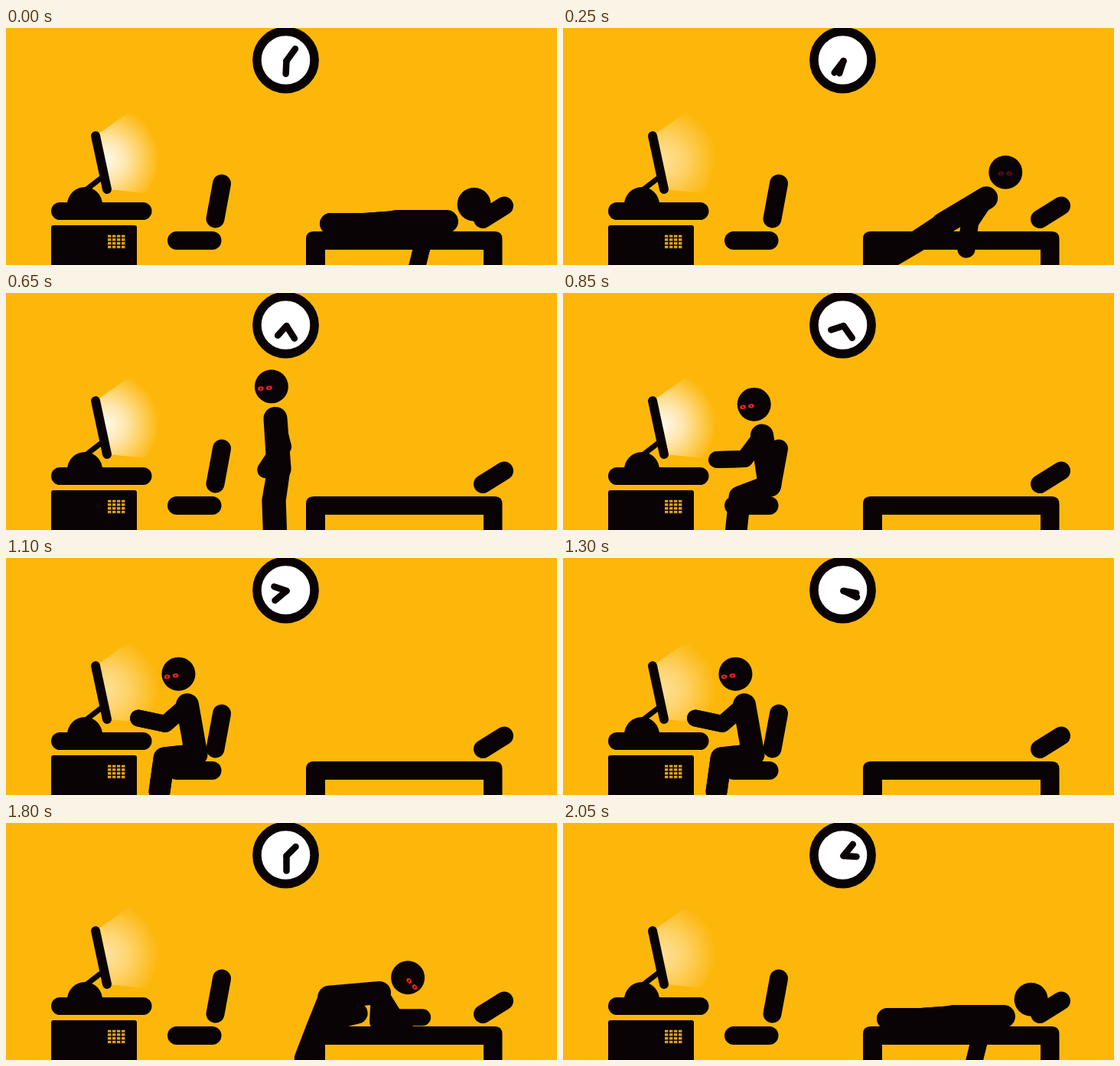
These frames come from a looping animation (720x310 px, 2.1 s). An HTML page:

```html
<!DOCTYPE html>
<html lang="en">
<head>
<meta charset="utf-8">
<title>Daily routine</title>
<style>
  html, body { margin: 0; width: 100%; height: 100%; overflow: hidden; background: #fdb70a; }
  svg { display: block; width: 720px; height: 310px; }
  #scene { filter: blur(.6px); }
  .line { fill: none; stroke: #0a0305; stroke-linecap: round; stroke-linejoin: round; }
  .ink { fill: #0a0305; }
  .hand { stroke-width: 8.5; }
  .pad { stroke-width: 24; }
  .arm { stroke-width: 22; }
  .leg { stroke-width: 28; }
  #torso { fill: #0a0305; stroke-width: 30; }
</style>
</head>
<body>
<svg viewBox="0 0 720 310">
  <defs>
    <radialGradient id="beam" gradientUnits="userSpaceOnUse" cx="130" cy="172" r="71">
      <stop offset="0" stop-color="#fff" stop-opacity=".96"/>
      <stop offset=".4" stop-color="#fff" stop-opacity=".66"/>
      <stop offset="1" stop-color="#fff" stop-opacity="0"/>
    </radialGradient>
    <pattern id="vent" x="133" y="270.5" width="6" height="4.8" patternUnits="userSpaceOnUse">
      <rect width="4.4" height="3.3" fill="#e2a51c"/>
    </pattern>
  </defs>
  <g id="scene">
    <!-- clock -->
    <circle cx="365.5" cy="42" r="37.6" fill="#fff" stroke="#0a0305" stroke-width="11.6"/>
    <path id="hour" class="line hand" d="M366.5 43v-17"/>
    <path id="minute" class="line hand" d="M366.5 43v-19.5"/>

    <!-- desk and screen -->
    <path id="glow" fill="url(#beam)" d="M120 139L161 110Q190 124 200 163Q198 196 182 216L134 211Z"/>
    <path class="line" stroke-width="12" d="M117 141L132 211"/>
    <path class="line" stroke-width="7" d="M126 195L104 212"/>
    <path class="ink" d="M80 231a23 23 0 0 1 46 0z"/>
    <rect class="ink" x="59" y="228" width="131.5" height="23" rx="11.5"/>
    <rect class="ink" x="59" y="258" width="112" height="60" rx="3"/>
    <rect x="133" y="270.5" width="23" height="18" fill="url(#vent)"/>

    <!-- chair -->
    <path class="line pad" d="M282 203.5L273.5 249.5"/>
    <path class="line pad" d="M223 278H269.5"/>

    <!-- bed and pillow -->
    <path class="ink" d="M392 320V276q0-10 10-10H638.5q10 0 10 10V320H624V290H417V320z"/>
    <path class="line pad" d="M623 250L651 232.5"/>

    <!-- person -->
    <path class="line leg"/><path class="line leg"/>
    <path id="torso" class="line"/>
    <path class="line arm"/><path class="line arm"/>
    <circle id="head" class="ink" r="22"/>
    <g id="eyes">
      <ellipse cx="-5.5" rx="4" ry="2.8" fill="#e02420"/>
      <ellipse cx="5.5" rx="4" ry="2.8" fill="#e02420"/>
      <circle cx="-5.5" r="1" class="ink"/>
      <circle cx="5.5" r="1" class="ink"/>
    </g>
  </g>
</svg>
<script>
const LOOP = 2100, STEP = 50;
const BONE = { neck: 42, spine: 66, upper: 38, fore: 36, thigh: 42, shin: 44 };
const $ = id => document.getElementById(id);
const legs = document.querySelectorAll('.leg');
const arms = document.querySelectorAll('.arm');

// x, y place the shoulder; bone angles are degrees from straight down, lean is from straight up.
// spread parts left and right limbs, kneel folds the far leg under the body.
const rest = { spread: 1, kneel: 0, face: 0, tilt: 0, awake: 1 };
const lying = { ...rest, x: 576, y: 253, lean: 58, spine: -90, upper: -52, fore: -14, thigh: -86, shin: -90, spread: 0, awake: 0 };
const upright = { ...rest, x: 507, y: 161, lean: -5, spine: 3, upper: 2, fore: 5, thigh: 3, shin: 1, face: -.15 };
const walk = { ...rest, x: 352, y: 164, lean: -7, spine: 4, upper: 13, fore: -33, thigh: -9, shin: 2, face: -.9, tilt: -5 };
const seated = { ...rest, x: 237, y: 192, lean: -16, spine: 10, upper: -49, fore: -102, thigh: -84, shin: -8, spread: 0, face: -1, tilt: -8 };
const rising = { ...rest, x: 260, y: 191, lean: 13, spine: -4, upper: 0, fore: -18, thigh: 0, shin: 0, spread: 15, face: 1, tilt: 20 };
const climb = { ...rest, x: 488, y: 222, lean: 62, spine: -85, upper: 32, fore: 90, thigh: -22, shin: -21, spread: 0, kneel: 1, face: 1, tilt: 48 };

const flipped = ['lean', 'spine', 'upper', 'fore', 'thigh', 'shin', 'face', 'tilt'];
const mirror = (pose, x) => {
  const copy = { ...pose, x };
  flipped.forEach(name => copy[name] *= -1);
  return copy;
};

const poses = [
  [0, lying], [150, lying], [450, upright], [650, walk], [900, seated], [1300, seated],
  [1500, rising], [1700, mirror(walk, 410)], [1800, climb], [1950, lying], [LOOP, lying]
];
const hours = [[0, 6.1], [650, 7.41], [1100, 9.64], [1500, 21], [1800, 25.5], [LOOP, 27.43]];

const lerp = (a, b, k) => a + (b - a) * k;
const mixPose = (a, b, k) =>
  Object.fromEntries(Object.keys(a).map(name => [name, lerp(a[name], b[name], k)]));

function at(keys, t, mix) {
  const n = keys.findIndex(key => key[0] > t);
  const [t0, a] = keys[n - 1], [t1, b] = keys[n];
  return mix(a, b, (t - t0) / (t1 - t0));
}

// one sine arch between two times, zero elsewhere
const arch = (t, from, to) => t > from && t < to ? Math.sin(Math.PI * (t - from) / (to - from)) : 0;

const reach = ([x, y], length, deg) => {
  const a = deg * Math.PI / 180;
  return [x + length * Math.sin(a), y + length * Math.cos(a)];
};
const aside = ([x, y], dx) => [x + dx, y];
const line = pts => 'M' + pts.map(p => p.map(v => v.toFixed(2)).join(' ')).join('L');

function drawPerson(t) {
  const p = at(poses, t, mixPose);
  const stride = 22 * (arch(t, 450, 650) + arch(t, 1500, 1700));
  const typing = t >= 900 && t <= 1300 ? 4 * Math.sin(Math.PI * (t - 1100) / 100) : 0;
  const shoulder = [p.x, p.y];
  const hip = reach(shoulder, BONE.spine, p.spine);
  const head = reach(shoulder, BONE.neck, 180 - p.lean);

  [-1, 1].forEach((side, far) => {
    const fold = far * p.kneel, s = side * p.spread;
    const elbow = reach(shoulder, BONE.upper, p.upper - 35 * fold);
    const hand = reach(elbow, BONE.fore, p.fore + typing);
    const knee = reach(hip, BONE.thigh, p.thigh + side * stride + 82 * fold);
    const foot = reach(knee, BONE.shin, p.shin + side * stride * .6 - 55 * fold);
    arms[far].setAttribute('d', line([aside(shoulder, s * .5), aside(elbow, s * 1.5), aside(hand, s * 1.7)]));
    legs[far].setAttribute('d', line([aside(hip, s), aside(knee, s * 1.67), aside(foot, s * 1.67)]));
  });

  const half = p.spread;
  $('torso').setAttribute('d', line([
    aside(shoulder, -half * .5), aside(shoulder, half * .5), aside(hip, half), aside(hip, -half)
  ]) + 'Z');
  $('head').setAttribute('cx', head[0]);
  $('head').setAttribute('cy', head[1]);
  $('eyes').setAttribute('transform', `translate(${head}) rotate(${p.tilt}) translate(${p.face * 9.7} 1.6)`);
  $('eyes').setAttribute('opacity', p.awake);
}

function draw(t) {
  const h = at(hours, t, lerp);
  $('hour').setAttribute('transform', `rotate(${h * 30 % 360} 366.5 43)`);
  $('minute').setAttribute('transform', `rotate(${h * 360 % 360} 366.5 43)`);
  const flicker = Math.cos(2 * Math.PI * (t / STEP + 2) / 17);
  $('glow').setAttribute('opacity', .6 + .5 * Math.max(0, flicker));
  drawPerson(t);
}

const start = performance.now();
function tick() {
  const t = (performance.now() - start) % LOOP;
  draw(Math.floor(t / STEP) * STEP);
  requestAnimationFrame(tick);
}
tick();
</script>
</body>
</html>
```
